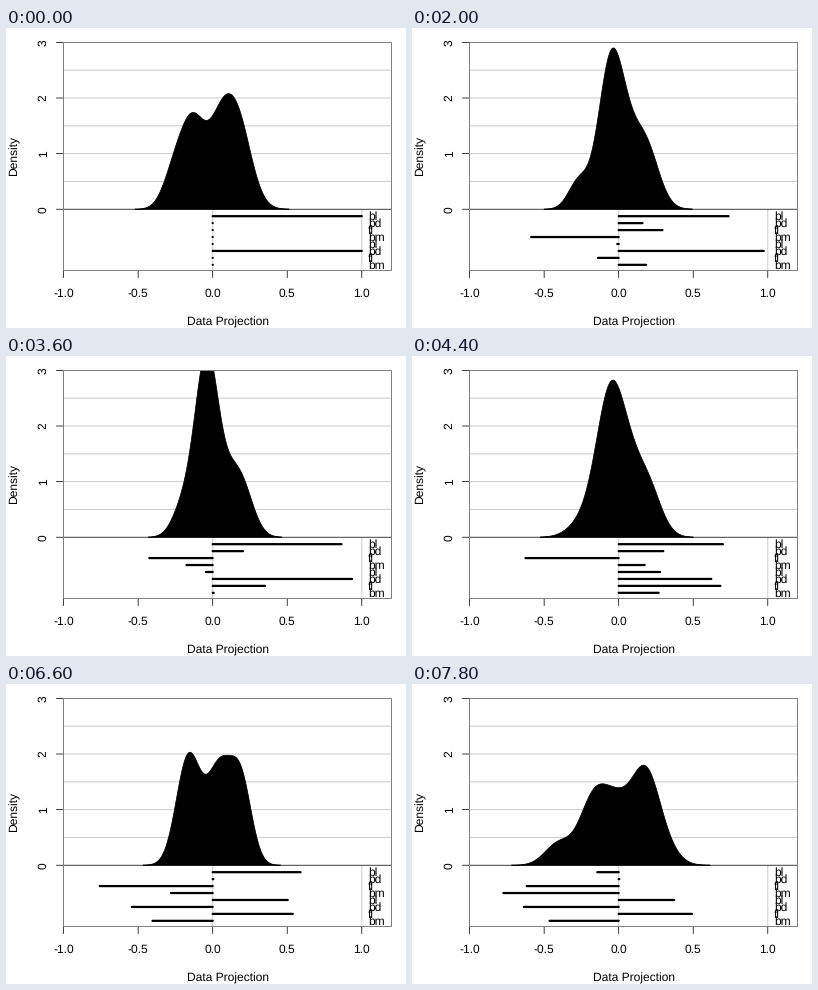
Write a matplotlib script that moves like this. It is 400x300 px and loops after 8000 ms.

```python
import numpy as np
import matplotlib.pyplot as plt
from matplotlib.animation import FuncAnimation
from matplotlib.patches import Polygon, Rectangle

plt.rcParams["font.family"] = "Liberation Sans"
plt.rcParams["text.hinting"] = "none"

W, H, DPI = 400, 300, 100
FRAMES, STEP_MS = 40, 200
PT = 72 / DPI                       # points per pixel
LEFT, RIGHT, TOP, BOTTOM = 57.6, 385.6, 14.4, 242.4
LABELS = ["bl", "bd", "fl", "bm"] * 2


def px(x):
    return LEFT + (x + 1) * (RIGHT - LEFT) / 2.2


def py(y):
    return TOP + (3 - y) * (BOTTOM - TOP) / 4.1


# Tour stops: frame -> two projection columns, weights of bl, bd, fl, bm
POSES = {
    0: [(1, 0, 0, 0), (0, 1, 0, 0)],
    6: [(.80, .10, .15, -.57), (0, .985, -.11, .14)],
    10: [(.74, .16, .295, -.59), (-.01, .98, -.14, .185)],
    15: [(.875, .14, -.205, -.42), (-.255, .95, -.01, -.205)],
    22: [(.70, .30, -.625, .175), (.28, .625, .685, .27)],
    28: [(.705, .21, -.675, .105), (.69, -.015, .725, .07)],
    33: [(.59, .005, -.76, -.28), (.505, -.545, .54, -.405)],
    39: [(-.145, .005, -.62, -.775), (.375, -.64, .495, -.465)],
}

# Penguin measures: count, mean, half the gap between the sexes, spread
SPECIES = [
    (151, (38.8, 18.35, 190, 3701), (1.57, .75, 2.3, 337), (2.15, .98, 6.1, 305)),
    (68, (48.8, 18.42, 196, 3733), (2.25, .83, 4.1, 206), (2.4, .77, 5.8, 325)),
    (123, (47.5, 14.98, 217, 5076), (1.95, .74, 4.4, 402), (2.4, .64, 4.9, 297)),
]
UNIT = 1.286 * np.array([27.5, 8.4, 59, 3600])   # half range times data range
RHO = .25                                        # correlation inside a cluster

clusters = [(n / 2, np.array(mean) + sign * np.array(gap), sd)
            for n, mean, gap, sd in SPECIES for sign in (-1, 1)]
SHARE, MEAN, SPREAD = (np.array(part) for part in zip(*clusters))
COUNT = 2 * SHARE.sum()
SHARE = SHARE / SHARE.sum()
MEAN = (MEAN - SHARE @ MEAN) / UNIT
SPREAD = SPREAD / UNIT
GRID = np.linspace(-1.1, 1.1, 881)


def slerp(a, b, s):
    a, b = a / np.linalg.norm(a), b / np.linalg.norm(b)
    angle = np.arccos(np.clip(a @ b, -1, 1))
    if angle < 1e-4:
        return a
    return (np.sin((1 - s) * angle) * a + np.sin(s * angle) * b) / np.sin(angle)


def basis(n):
    stops = list(POSES)
    i = min(np.searchsorted(stops, n, side="right"), len(stops) - 1)
    a, b = stops[i - 1], stops[i]
    cols = [slerp(np.array(p, float), np.array(q, float), (n - a) / (b - a))
            for p, q in zip(POSES[a], POSES[b])]
    u, _, v = np.linalg.svd(np.array(cols), full_matrices=False)
    return u @ v


def outline(n):
    """Kernel density of both projected columns pooled, as a polygon."""
    cols = basis(n)
    mean = (cols @ MEAN.T).ravel()
    parts = cols[:, None, :] * SPREAD
    var = ((1 - RHO) * (parts ** 2).sum(2) + RHO * parts.sum(2) ** 2).ravel()
    share = np.tile(SHARE, 2) / 2

    def density(v):
        z2 = (GRID[:, None] - mean) ** 2 / v
        return (np.exp(-z2 / 2) / np.sqrt(2 * np.pi * v)) @ share

    # Rule-of-thumb bandwidth, tails cut three bandwidths past the data
    cdf = np.cumsum(density(var)) * (GRID[1] - GRID[0])
    lo, q1, q3, hi = np.interp([1 / COUNT, .25, .75, 1 - 1 / COUNT], cdf, GRID)
    sd = np.sqrt(share @ (var + mean ** 2))
    bw = .9 * min(sd, (q3 - q1) / 1.34) * COUNT ** -.2
    x = np.linspace(lo - 3 * bw, hi + 3 * bw, 400)
    y = np.minimum(np.interp(x, GRID, density(var + bw ** 2)), 3)
    x = np.concatenate([x[:1], x, x[-1:]])
    y = np.concatenate([[0], y, [0]])
    return np.column_stack([px(x), py(y)])


fig = plt.figure(figsize=(W / DPI, H / DPI), dpi=DPI, facecolor="white")
ax = fig.add_axes([0, 0, 1, 1])
ax.set_xlim(0, W)
ax.set_ylim(H, 0)
ax.axis("off")


def line(xs, ys, color="black", width=.75, z=1, cap="round"):
    return ax.plot(xs, ys, color=color, lw=width * PT, zorder=z,
                   solid_capstyle=cap, snap=False)[0]


def label(x, y, text, ha="center", rotation=0):
    ax.text(x, y, text, fontsize=12 * PT, ha=ha, va="baseline",
            rotation=rotation, rotation_mode="anchor", zorder=8)


# Axes
for v in (-1, -.5, 0, .5, 1):
    line([px(v)] * 2, [BOTTOM, BOTTOM + 7.2])
    label(px(v), 269, f"{v:.1f}")
for v in range(4):
    line([LEFT - 7.2, LEFT], [py(v)] * 2)
    label(40.6, py(v), str(v), rotation=90)
label((LEFT + RIGHT) / 2, 297.6, "Data Projection")
label(12, (TOP + BOTTOM) / 2, "Density", rotation=90)

# Panel
for v in np.arange(.5, 3, .5):
    line([LEFT, RIGHT], [py(v)] * 2, "#cccccc", 1, 3, "butt")
for v in (0, 1):
    line([px(v)] * 2, [py(0), BOTTOM], "#cccccc", 1, 3, "butt")
line([LEFT, RIGHT], [py(0)] * 2, z=5, cap="butt")
ax.add_patch(Rectangle((57.5, 14.5), 328, 228, fill=False, ec="#808080",
                       lw=PT, zorder=6, snap=False))

hill = ax.add_patch(Polygon(outline(0), closed=True, fc="black", ec="black",
                            lw=.75 * PT, zorder=4, snap=False))
rows = py(-np.arange(1, 9) / 8)
bars = [line([px(0)] * 2, [y] * 2, width=2.25, z=7) for y in rows]
for y, name in zip(rows, LABELS):
    label(px(1) + 6, y + 4, name, ha="left")


def update(n):
    hill.set_xy(outline(n))
    for bar, w in zip(bars, basis(n).ravel()):
        # the tiny extra length keeps an empty bar visible as a dot
        bar.set_xdata([px(0), px(w) + .02])
    return [hill, *bars]


anim = FuncAnimation(fig, update, frames=FRAMES, interval=STEP_MS,
                     init_func=lambda: update(0), repeat=True, repeat_delay=0)
plt.show()
```
